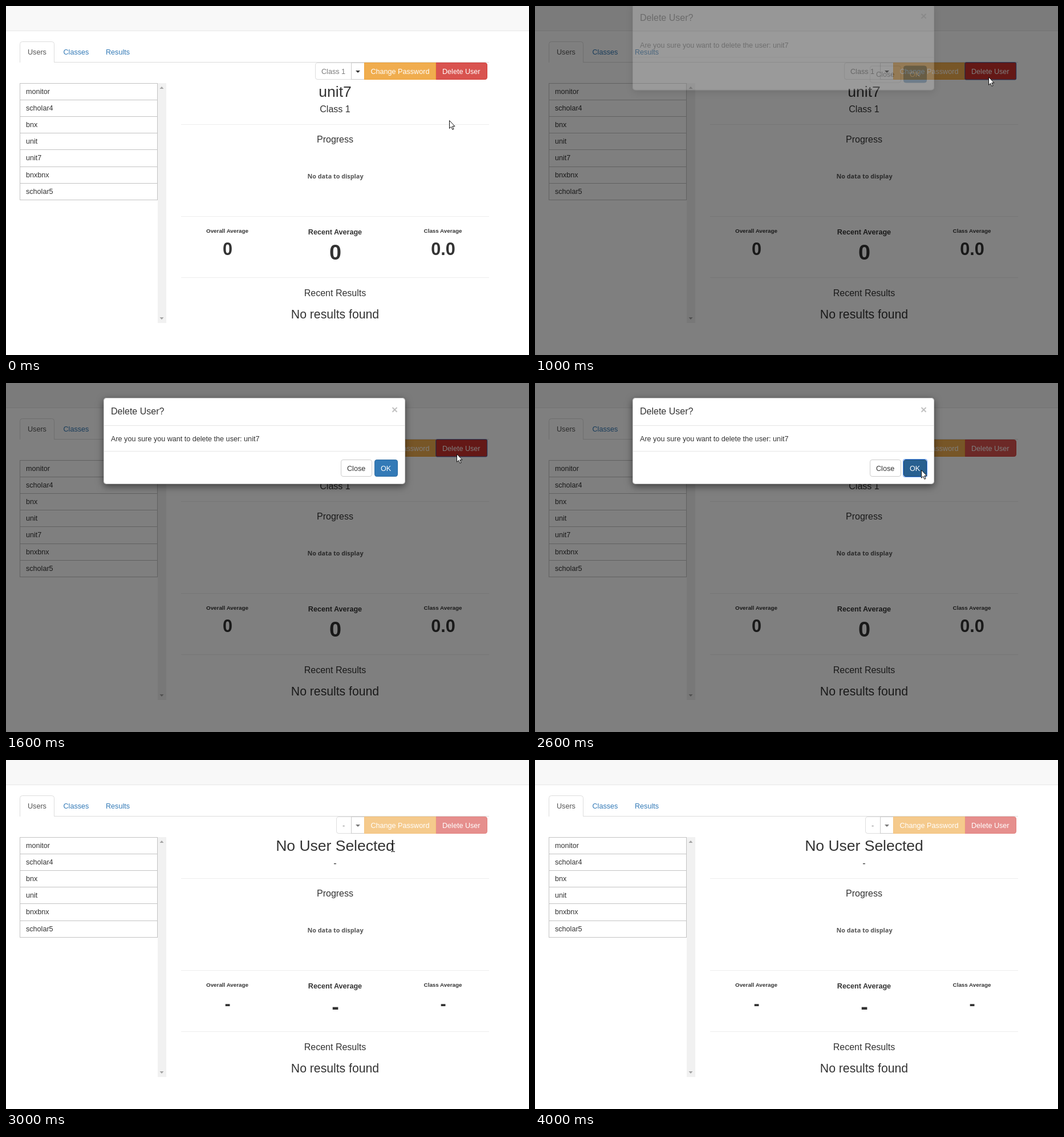
Animation, 917 px wide and 611 px high, one loop 4800 ms. Source, as an HTML page:

```html
<!DOCTYPE html>
<html lang="en">
<head>
<meta charset="utf-8">
<title>Delete user</title>
<style>
  html, body { margin: 0; width: 100%; height: 100%; overflow: hidden; background: #fff; }
  svg { display: block; }
  text { font-family: "Liberation Sans", Arial, sans-serif; font-size: 12.6px; fill: #333; }
  .mid { text-anchor: middle; }
  .bold { font-weight: bold; }
</style>
</head>
<body>
<svg id="stage" width="917" height="611" viewBox="0 0 917 611"></svg>
<script>
const LOOP = 4800;

const text = (x, y, label, attrs = "") => `<text x="${x}" y="${y}" ${attrs}>${label}</text>`;
const centered = (x, y, size, label, cls = "") =>
  text(x, y, label, `class="mid ${cls}" style="font-size:${size}px"`);
const color = c => `style="fill:${c}"`;
const box = (x, y, w, h, fill, stroke, r = 0) =>
  `<rect x="${x + .5}" y="${y + .5}" width="${w - 1}" height="${h - 1}" rx="${r}" fill="${fill}" stroke="${stroke}"/>`;
const rule = (x1, x2, y, c) => `<path d="M${x1} ${y + .5}H${x2}" stroke="${c}"/>`;
const triangle = (x, y, w, h, c) => `<path d="M${x - w / 2} ${y}h${w}l${-w / 2} ${h}z" fill="${c}"/>`;

function userList(users) {
  const lineY = i => Math.floor(135 + 29.2 * i);
  const lines = [...users, ""].map((_, i) => rule(24, 266, lineY(i), "#c3c3c3")).join("");
  const sides = `<path d="M24.5 135V${lineY(users.length)}M265.5 135V${lineY(users.length)}" stroke="#c3c3c3"/>`;
  const names = users.map((name, i) => text(35, lineY(i) + 19, name)).join("");
  return lines + sides + names;
}

function frameOfPage() {
  return `<rect width="917" height="43" fill="#f8f8f8"/>` + rule(0, 917, 43, "#e7e7e7") +
    rule(24, 847, 98, "#ddd") +
    `<path d="M24.5 99V66.5a4 4 0 0 1 4-4H80.5a4 4 0 0 1 4 4V99" fill="#fff" stroke="#ddd"/>` +
    text(38, 85, "Users", color("#555")) +
    text(100.5, 85, "Classes", color("#337ab7")) +
    text(175, 85, "Results", color("#337ab7")) +
    `<rect x="266" y="135" width="15" height="420" fill="#f1f1f1"/>` +
    triangle(273, 145, 7, -4, "#a3a3a3") + triangle(273, 545, 7, 4, "#a3a3a3") +
    [207, 368, 475].map(y => rule(307, 847, y, "#eee")).join("") +
    centered(577, 239, 16, "Progress") +
    text(577.5, 302, "No data to display",
      `class="mid bold" style="font-family:'Open Sans',sans-serif;font-size:10.8px;fill:#555"`) +
    centered(388, 397, 9.8, "Overall Average", "bold") +
    centered(577, 400, 12.6, "Recent Average", "bold") +
    centered(766, 397, 9.8, "Class Average", "bold") +
    centered(577, 507.5, 16, "Recent Results") +
    centered(577, 547, 21.2, "No results found");
}

function details({ users, title, group, groupX, scores, scoreY, colors }) {
  const [orange, orangeEdge, red, redEdge, caret] = colors;
  return userList(users) +
    box(groupX, 99, 612 - groupX, 30, "#fff", "#ddd", 3.6) +
    text(groupX + 11, 119, group, color("#7b7b7b")) +
    box(605, 99, 24, 30, "#fff", "#ccc") + triangle(617, 113, 8, 4, caret) +
    box(748, 99, 96, 30, red, redEdge, 3.6) +
    box(628, 99, 126, 30, orange, orangeEdge) +
    `<g id="${title === "unit7" ? "pressed" : "idle"}"></g>` +
    text(639.5, 119, "Change Password", color("#fff")) +
    text(765, 119, "Delete User", color("#fff")) +
    centered(577, 158.5, 26.5, title) +
    centered(577, 186, 16, group) +
    centered(388.6, scoreY, 30.6, scores[0], "bold") +
    centered(577.6, 443.5, 37.8, scores[1], "bold") +
    centered(766.6, scoreY, 30.6, scores[2], "bold");
}

const allUsers = ["monitor", "scholar4", "bnx", "unit", "unit7", "bnxbnx", "scholar5"];
const selected = details({
  users: allUsers, title: "unit7", group: "Class 1", groupX: 542,
  scores: ["0", "0", "0.0"], scoreY: 436,
  colors: ["#f0ad4e", "#eea236", "#d9534f", "#d43f3a", "#333"]
});
const unselected = details({
  users: allUsers.filter(name => name !== "unit7"), title: "No User Selected", group: "-", groupX: 579,
  scores: ["-", "-", "-"], scoreY: 437,
  colors: ["#f5ca8c", "#f4c37c", "#e68f8d", "#e3827f", "#777"]
});

const dialog =
  `<rect x="171" y="26" width="529" height="151" rx="5" fill="#fff" style="filter:drop-shadow(0 4.5px 6.5px rgba(0,0,0,.5))"/>` +
  box(171, 26, 529, 151, "none", "rgba(0,0,0,.2)", 5) +
  rule(172, 699, 74, "#e5e5e5") + rule(172, 699, 119, "#e5e5e5") +
  text(184, 55, "Delete User?", `style="font-size:16px"`) +
  centered(681.5, 53, 18.9, "×", "bold").replace("<text", `<text opacity=".3"`) +
  text(184, 102, "Are you sure you want to delete the user: unit7") +
  box(587, 134, 55, 30, "#fff", "#ccc", 3.6) + text(598, 153.5, "Close") +
  `<g id="ok"></g>` + text(657, 153.5, "OK", color("#fff"));

const stage = document.getElementById("stage");
stage.innerHTML = frameOfPage() +
  `<g id="selected">${selected}</g><g id="unselected">${unselected}</g>` +
  `<rect id="backdrop" width="917" height="611"/>` +
  `<g id="dialog">${dialog}</g>` +
  `<path id="arrow" d="M.5.5V14.3L3.6 11.4 5.9 16.4 8 15.5 5.8 10.6H10Z" fill="#fff" stroke="#111"/>` +
  `<path id="beam" d="M675 146.5h3l.5.5.5-.5h3M678.5 147v13M675 160.5h3l.5-.5.5.5h3" fill="none" stroke="#111"/>`;

const el = id => document.getElementById(id);
const show = (id, on) => el(id).setAttribute("display", on ? "inline" : "none");

el("pressed").innerHTML = box(754, 99, 90, 30, "#c9302c", "#ac2925", 2) +
  `<rect x="753.7" y="98.7" width="90" height="30.3" rx="2" fill="none" stroke="#4a68b0"/>`;

// Pointer tip: [from ms, x, y]
const pointer = [
  [0, 777, 200], [200, 782, 136], [400, 782, 135], [600, 789, 127], [800, 795, 124],
  [1600, 790, 124], [1800, 733, 140], [2000, 691, 150], [2200, 677, 157], [2600, 677, 152],
  [3400, 648, 193], [3600, 521, 427], [3800, 355, 602]
];
// Dialog entrance: [from ms, opacity, vertical offset]
const entrance = [[0, 0, -38], [1000, .21, -29.5], [1200, 1, -2], [1400, 1, 0]];
const latest = (steps, t) => steps.findLast(step => step[0] <= t);

function draw(now) {
  const t = now % LOOP;
  const within = (from, to) => t >= from && t < to;

  show("selected", t < 2800);
  show("unselected", t >= 2800);
  show("pressed", within(800, 2600));
  show("backdrop", within(1000, 3000));
  el("backdrop").setAttribute("opacity", t < 2800 ? .5 : .44);

  const [, opacity, dy] = latest(entrance, t);
  show("dialog", within(1000, 2800));
  el("dialog").setAttribute("opacity", opacity);
  el("dialog").setAttribute("transform", `translate(0 ${dy})`);
  const hover = t >= 2200;
  el("ok").innerHTML = box(646, 134, 41, 30, hover ? "#286090" : "#337ab7", hover ? "#204d74" : "#2e6da4", 3.6) +
    (t >= 2600 ? `<rect x="645.5" y="133.5" width="42" height="31" rx="3" fill="none" stroke="#4d90fe"/>` : "");

  const [, x, y] = latest(pointer, t);
  show("arrow", t < 4000 && !within(3000, 3400));
  el("arrow").setAttribute("transform", `translate(${x} ${y})`);
  show("beam", within(3000, 3400));
  requestAnimationFrame(() => draw(performance.now() - start));
}

const start = performance.now();
draw(0);
</script>
</body>
</html>
```
